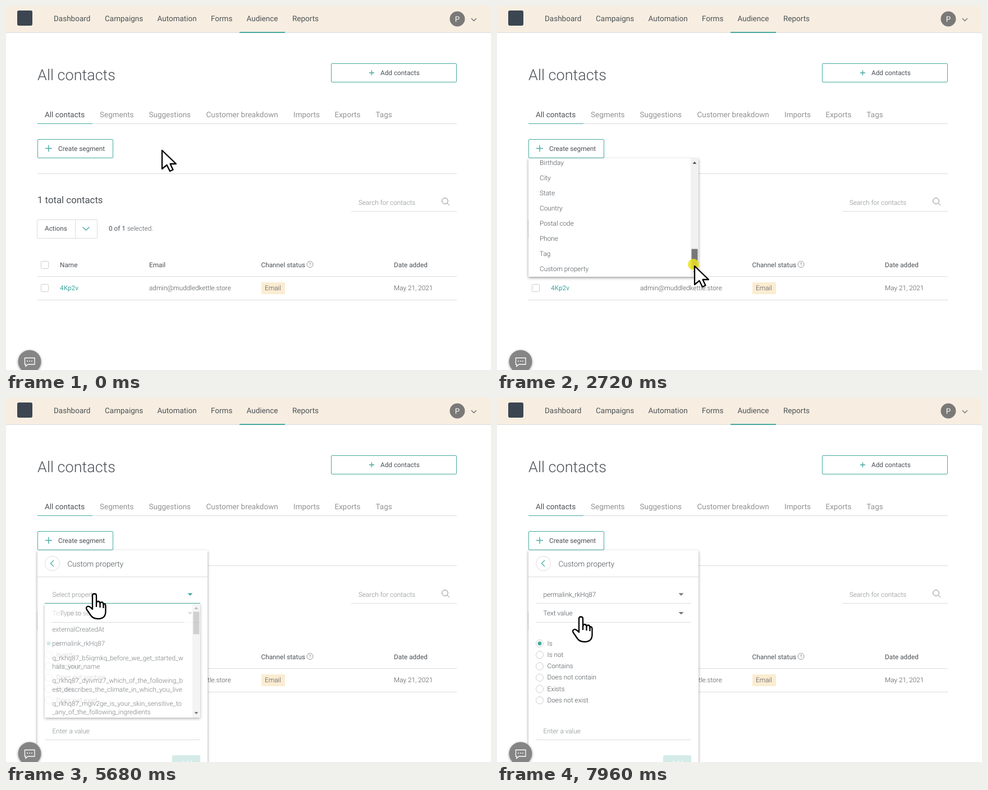
An HTML page for the animation above (8 s loop, 864 by 648 pixels).

```html
<!DOCTYPE html>
<html lang="en">
<head>
<meta charset="utf-8">
<title>All contacts</title>
<style>
html, body { margin: 0; width: 100%; height: 100%; overflow: hidden; background: #fff; }
svg { display: block; }
text { font: 400 11.8px Roboto, sans-serif; fill: #4c5156; text-rendering: geometricPrecision; white-space: pre; }
text.light, .light { font-weight: 300; }
text.pale { fill: #85898c; }
text.tab { fill: #929292; }
text.nav, text.tab { font-size: 13.5px; }
text.title { font-size: 27px; font-weight: 300; }
text.total { font-size: 16.8px; }
text.group { font-size: 8.4px; letter-spacing: .8px; }
text.teal { fill: #3fa69d; }
text.white { fill: #fff; }
text.tip { font: 500 9.7px "Open Sans", sans-serif; fill: #fff; }
.rule { stroke: #dcdcdc; fill: none; }
.accent { stroke: #45a9a0; fill: none; }
.shadow { fill: #fff; filter: drop-shadow(0 2px 2.5px rgba(0, 0, 0, .4)); }
.cursor { fill: #fff; stroke: #000; stroke-width: 2.3; stroke-linejoin: round; }
</style>
</head>
<body>
<svg id="stage" width="864" height="648" viewBox="0 0 864 648"></svg>
<script>
const text = (x, y, s, cls = '', more = '') => `<text x="${x}" y="${y}" dy=".355em" class="${cls}" ${more}>${s}</text>`;
const path = (d, cls = 'rule', more = '') => `<path d="${d}" class="${cls}" ${more}/>`;
const rect = (x, y, w, h, more) => `<rect x="${x}" y="${y}" width="${w}" height="${h}" ${more}/>`;
const circle = (x, y, r, more) => `<circle cx="${x}" cy="${y}" r="${r}" ${more}/>`;
const rule = (x1, x2, y, cls, more) => path(`M${x1} ${y}H${x2}`, cls, more);
const plus = (x, y, r) => path(`M${x - r} ${y}h${2 * r}M${x} ${y - r}v${2 * r}`, 'accent', 'stroke-width="1.4"');
const row = (y, cls, cells) => cells.map(([x, s]) => text(x, y, s, cls)).join('');
const checkbox = y => rect(62.5, y, 13, 13, 'rx="2" fill="#fff" stroke="#ccc"');
const caret = (x, y, id = '') => `<path id="${id}" d="M${x - 4.5} ${y - 2}h9l-4.5 4.5z" fill="#777"/>`;
const scrollbar = (id, x, top, bottom, thumb) =>
  rect(x, top, 14, bottom - top, 'fill="#f1f1f1"') +
  `<path id="${id}Up" d="M${x + 3.5} ${top + 10}h7l-3.5 -4z" fill="#a3a3a3"/>` +
  `<path id="${id}Down" d="M${x + 3.5} ${bottom - 10}h7l-3.5 4z" fill="#505050"/>` +
  rect(x + 1.5, top + 14.5, 11, thumb, `id="${id}Thumb" fill="#c1c1c1"`);

const groups = {
  'FILTER BY CHANNELS': 'Email channel,SMS channel,Browser push notifications channel',
  'FILTER BY SHOPPING BEHAVIOUR': 'Placed order,Purchased product,Orders count,Total spent,Average order value,Abandoned cart,Viewed product,Last order date',
  'FILTER BY CAMPAIGN ACTIVITY': 'Campaign sent,Campaign opened,Campaign clicked,Automation sent,Automation opened,Automation clicked,Message bounced,Form viewed,Form submitted',
  'FILTER BY CONTACT DETAILS': 'Date added,Signup source,Email address,First name,Last name,Gender,Language,Birthday,City,State,Country,Postal code,Phone,Tag,Custom property'
};
const MAX_SCROLL = 879;

function filterList() {
  let y = 317, out = text(69, 287.5, 'Search', 'light pale');
  for (const [name, items] of Object.entries(groups)) {
    out += rule(56, 345, y - 13.5) + text(62.5, y, name, 'group');
    y += 28;
    for (const item of items.split(',')) { out += text(76, y, item, 'light'); y += 27; }
  }
  return out;
}

const page = () =>
  rect(0, 0, 864, 47, 'fill="#f7eee1"') + rule(0, 864, 47.5) +
  rect(20, 8, 27, 27, 'rx="3" fill="#3c4651"') +
  row(22, 'nav', [[85, 'Dashboard'], [176, 'Campaigns'], [269.5, 'Automation'], [365, 'Forms'], [428.5, 'Audience'], [510, 'Reports']]) +
  rule(416, 497, 47, 'accent', 'stroke-width="2"') +
  circle(804, 23, 13.5, 'fill="#7b7978"') + text(804, 23, 'P', 'nav white', 'text-anchor="middle"') +
  path('M829 22l4.5 4.5l4.5 -4.5', '', 'fill="none" stroke="#777" stroke-width="1.5"') +
  text(56, 122.5, 'All contacts', 'title') +
  rect(579.5, 102.5, 223, 33, 'rx="1.5" class="accent"') + plus(651.5, 119, 4.5) + text(667, 118.5, 'Add contacts') +
  text(69, 193, 'All contacts', 'nav') +
  row(193, 'tab', [[167, 'Segments'], [254.5, 'Suggestions'], [356.5, 'Customer breakdown'], [512, 'Imports'], [585.5, 'Exports'], [658.5, 'Tags']]) +
  rule(56, 803, 209.5) + rule(56, 154, 209.5, 'accent') +
  rect(56.5, 237.5, 134, 33, 'id="segment" rx="1.5" fill="#fff" stroke="#45a9a0"') + plus(76, 253.5, 6) + text(93, 253.5, 'Create segment') +
  rule(56, 803, 298.5) +
  text(56, 345.5, '1 total contacts', 'total') +
  text(628, 349.5, 'Search for contacts', 'light pale') + rule(615, 803, 365.5) +
  circle(782, 347, 5.3, 'fill="none" stroke="#888"') + path('M786 351l4 4', '', 'stroke="#888"') +
  rect(55.5, 380.5, 107, 33, 'rx="1.5" class="rule"') + path('M123.5 380v33') +
  path('M136.5 393.5l6 5.5l6 -5.5', 'accent', 'stroke-width="1.3"') +
  text(69, 396, 'Actions') + text(183, 396, '0 of 1 <tspan class="light">selected.</tspan>') +
  checkbox(454.5) + row(461, '', [[96, 'Name'], [255, 'Email'], [454.5, 'Channel status'], [691, 'Date added']]) +
  circle(541.5, 460, 5.5, 'fill="none" stroke="#888" stroke-width=".9"') +
  text(541.5, 460.2, '?', 'pale', 'text-anchor="middle" style="font-size:8.5px"') +
  rule(56, 803, 481.5) + checkbox(495.5) + text(96, 501.5, '4Kp2v', 'teal') +
  rect(455, 492, 42, 21, 'fill="#fbecd2"') +
  row(501.5, 'light', [[255, 'admin@muddledkettle.store'], [461, 'Email'], [691, 'May 21, 2021']]) +
  rule(56, 803, 523.5);

const filterPanel = () => `<g id="filters">` + rect(56, 271, 303, 211, 'class="shadow"') +
  rect(56, 455, 289, 27, 'id="propertyHover" fill="#e6e7e8"') +
  `<clipPath id="view">${rect(56, 271, 289, 211, '')}</clipPath><g clip-path="url(#view)"><g id="list">${filterList()}</g></g>` +
  scrollbar('filter', 345, 271, 482, 35) + `</g>`;

const formPanel = () => `<g id="form">` + rect(56, 271, 303, 400, 'class="shadow"') +
  circle(82.5, 294.5, 13, 'class="rule"') + path('M85 289l-5.5 5.5l5.5 5.5', 'accent', 'stroke-width="1.3"') +
  text(109.5, 295, 'Custom property', 'nav light') + rule(56, 359, 318.5) +
  text(82.5, 349.5, 'Select property', 'light pale', 'id="placeholder"') +
  text(82.5, 349.5, 'permalink_rkHq87', 'light', 'id="chosen"') +
  caret(328, 349.5, 'caret') + rule(69, 346, 365.5, 'rule', 'id="selectLine"') +
  text(82.5, 383, 'Text value', 'light') + caret(328, 383) + rule(69, 346, 399.5) +
  ['Is', 'Is not', 'Contains', 'Does not contain', 'Exists', 'Does not exist'].map((s, i) =>
    circle(76, 437 + i * 20.25, 6.5, 'fill="#fff" stroke="#ccc"') + text(89.5, 436.5 + i * 20.25, s, 'light')).join('') +
  circle(76, 437, 3.4, 'fill="#45a9a0"') +
  text(82.5, 592.5, 'Enter a value', 'light pale') + rule(69, 346, 608.5) +
  rect(296, 636, 50, 33, 'rx="2" fill="#d4ebe8"') + text(321, 650, 'Add', 'white', 'text-anchor="middle"') + `</g>`;

const dropdown = () => `<g id="dropdown">` + rect(69, 366, 277, 203, 'class="shadow"') + rule(69, 346, 365.5, 'accent') +
  rect(69, 400, 263, 25, 'id="itemHover" fill="#e6e7e8"') +
  text(96, 383, 'Type to search', 'light pale') + rule(83, 318, 399.5) +
  [[412, 'externalCreatedAt'], [437, 'permalink_rkHq87'],
   [462.5, 'q_rkhq87_b5iqmkq_before_we_get_started_w'], [478, 'hats_your_name'],
   [503, 'q_rkhq87_dyivmz7_which_of_the_following_b'], [518.5, 'est_describes_the_climate_in_which_you_live'],
   [543.5, 'q_rkhq87_mgiv2ge_is_your_skin_sensitive_to'], [559, '_any_of_the_following_ingredients']]
    .map(([y, s]) => text(82.5, y, s, 'light')).join('') +
  scrollbar('drop', 332, 366, 569, 40) + `</g>`;

const overlay = () =>
  circle(42, 633, 20.5, 'fill="#858585" style="filter:drop-shadow(0 1px 2px rgba(0,0,0,.4))"') +
  path('M33.5 626.5h17.5v11.5h-12l-4 3.5v-3.5h-1.5z', '', 'fill="none" stroke="#fff" stroke-width="1.3"') +
  [38, 42, 46].map(x => circle(x, 632.3, 1, 'fill="#fff"')).join('') +
  `<g id="tooltip">` + path('M80 210.5h86q3 0 3 3v23q0 3 -3 3h-38l-5 5l-5 -5h-38q-3 0 -3 -3v-23q0 -3 3 -3z', '', 'fill="#5e6671"') +
  text(123, 225.5, 'Add a set of rules', 'tip', 'text-anchor="middle"') + `</g>` +
  `<g id="pointer">` + circle(-2, -2, 10, 'id="click" fill="#ebe31c" opacity=".85"') +
  path('M0 1V34L8.5 27L14 38L19.5 35.5L14.5 25H25Z', 'cursor', 'id="arrow"') +
  `<g id="hand" class="cursor">` +
  path('M-4 27V3Q-4 -.5 -.5 -.5Q3 -.5 3 3V17Q3.5 12.5 6.5 13Q9.5 13.5 9.5 17Q10 14 13 14.5Q15.5 15 15.5 19Q16 16.5 18 17.5Q19.5 18.5 19.5 22V31Q19.5 44 6 44Q-3 44 -7 38L-14.5 27Q-16 23 -12.5 22Q-9 21.5 -4 27Z', '') +
  path('M3 16V23M9.5 17V24M15.5 19V25', '') + `</g></g>`;

const stage = document.getElementById('stage');
stage.innerHTML = page() + filterPanel() + formPanel() + dropdown() + overlay();
const el = {};
stage.querySelectorAll('[id]').forEach(node => node.id && (el[node.id] = node));

// Pointer stops: tick, x, y
const stops = [
  [0, 278, 256], [3, 278, 256], [7, 172, 256], [12, 172, 256], [13, 174, 268], [17, 327, 279], [19, 353, 300],
  [20, 353, 300], [27, 352, 462], [28, 352, 462], [32, 242, 471], [43, 242, 472], [49, 142, 410], [51, 154, 333],
  [52, 158, 349], [61, 158, 349], [64, 158, 398], [67, 157, 440], [73, 157, 440], [79, 150, 390], [81, 150, 390]
];
const clamp = v => Math.max(0, Math.min(1, v));
const smooth = v => v * v * (3 - 2 * v);

function pointerAt(tick) {
  const i = stops.findIndex(stop => stop[0] > tick);
  const [t0, x0, y0] = stops[i - 1], [t1, x1, y1] = stops[i];
  const p = smooth((tick - t0) / (t1 - t0));
  return [x0 + (x1 - x0) * p, y0 + (y1 - y0) * p];
}

function show(id, opacity) {
  el[id].style.display = +opacity ? '' : 'none';
  el[id].style.opacity = +opacity;
}
const fill = (id, colour) => el[id].setAttribute('fill', colour);

function draw(ms) {
  const tick = Math.floor((ms * 1.006 + 22) / 100);
  const within = (a, b) => tick >= a && tick <= b;
  const [x, y] = pointerAt(tick);

  const scroll = tick > 20 ? clamp((y - 300) / 147) : 0;
  el.list.setAttribute('transform', `translate(0 ${-scroll * MAX_SCROLL})`);
  el.filterThumb.setAttribute('transform', `translate(0 ${scroll * 147})`);
  fill('filterThumb', within(20, 27) ? '#787878' : within(19, 28) ? '#a8a8a8' : '#c1c1c1');
  fill('filterUp', scroll > 0 ? '#505050' : '#a3a3a3');
  fill('filterDown', scroll < 1 ? '#505050' : '#a3a3a3');

  fill('segment', within(9, 13) ? '#dadbdb' : '#fff');
  show('tooltip', within(7, 13));
  show('filters', tick < 40 ? clamp((tick - 9) / 3) : 0);
  show('propertyHover', within(30, 39) && x < 345);

  const open = within(55, 71);
  show('form', tick >= 40);
  show('dropdown', open ? clamp((tick - 54) / 4) : tick === 72 ? .4 : 0);
  show('placeholder', tick < 72);
  show('chosen', tick >= 72);
  fill('caret', open ? '#45a9a0' : '#777');
  el.selectLine.setAttribute('class', open ? 'accent' : 'rule');
  show('itemHover', open && y > 400);
  el.itemHover.setAttribute('y', y < 425 ? 400 : 425);

  const hand = within(6, 13) || within(30, 39) || within(50, 72) || tick > 72 && (y > 428 || y < 401);
  el.pointer.setAttribute('transform', `translate(${x} ${y})`);
  show('hand', hand);
  show('arrow', !hand);
  show('click', [9, 39, 54, 69].includes(tick) || within(20, 27) ? .85 : 0);
}

(function loop() {
  draw(performance.now() % 8000);
  requestAnimationFrame(loop);
})();
</script>
</body>
</html>
```
